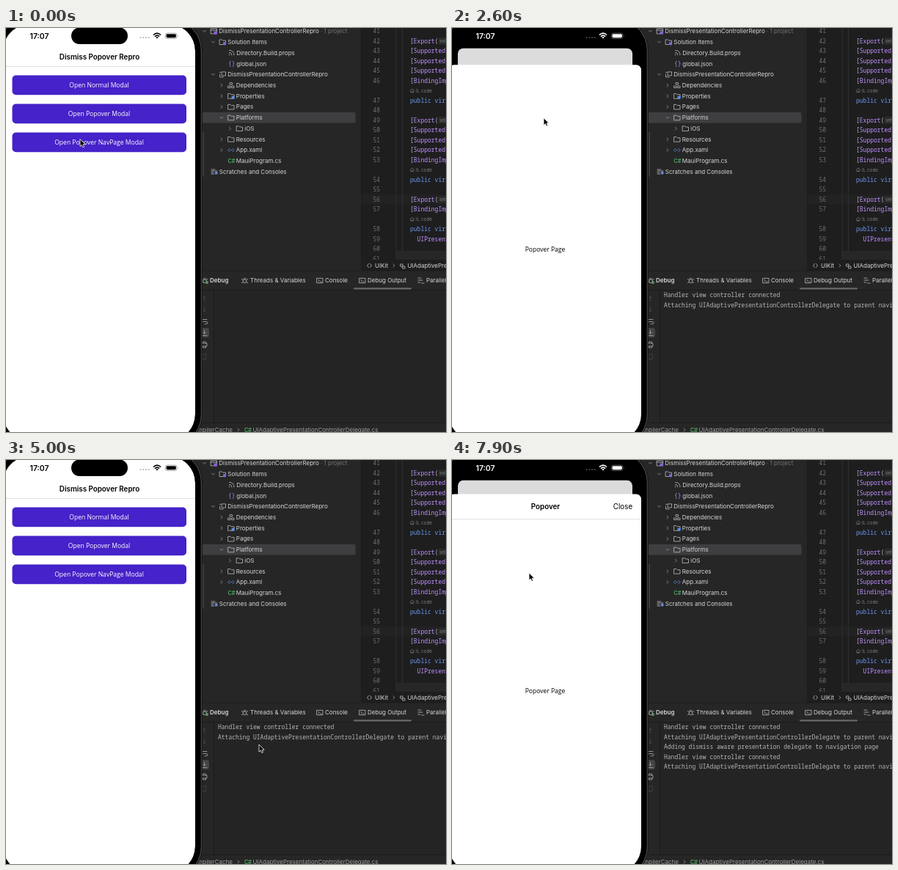
Write an HTML page that moves like this. It is 600 px wide and 551 px high and loops after 8000 ms.

```html
<!DOCTYPE html>
<html lang="en">
<head>
<meta charset="utf-8">
<title>Dismiss Popover Repro</title>
<style>
html, body { margin: 0; width: 100%; height: 100%; overflow: hidden; background: #1e1e1f; }
svg { display: block; width: 600px; height: 551px; }
text { white-space: pre; }
.ui { font: 8px Inter, sans-serif; fill: #d7d7d9; }
.mono { font: 500 8px "Noto Sans Mono", "DejaVu Sans Mono", monospace; fill: #b6b6b8; }
.hint { font: 6.3px Inter, sans-serif; fill: #7c7d80; }
.btn { font: 8.55px "Open Sans", sans-serif; text-anchor: middle; }
.nav { font: 600 9.8px Inter, sans-serif; text-anchor: middle; fill: #000; }
.line { fill: none; stroke: #b9bbbf; stroke-width: .8; stroke-linecap: round; stroke-linejoin: round; }
</style>
</head>
<body>
<svg viewBox="0 0 600 551">
  <defs>
    <clipPath id="screen"><rect x="-4" y="-5" width="262" height="568" rx="36"/></clipPath>
    <clipPath id="editor"><rect x="484" y="0" width="116" height="316"/></clipPath>
  </defs>
  <rect width="600" height="551" fill="#1e1e1f"/>
  <g id="ide"></g>
  <g id="log"></g>

  <rect x="266" y="141" width="4" height="62" rx="1.5" fill="#3c3c3d"/>
  <rect x="-13" y="-14" width="281" height="586" rx="45" fill="#111"/>
  <rect x="-12" y="-13" width="278.4" height="584" rx="44" fill="#000" stroke="#404041" stroke-width="1.5"/>
  <g clip-path="url(#screen)">
    <g id="page">
      <rect class="card" x="-4" y="-5" width="262" height="568" fill="#fff"/>
      <path d="M-4 52.5H258" stroke="#d2d2d4" stroke-width=".7"/>
      <text class="nav" x="127.5" y="42.5">Dismiss Popover Repro</text>
      <g id="buttons"></g>
      <rect class="card" id="dim" x="-4" y="-5" width="262" height="568"/>
    </g>
    <g id="sheet">
      <rect x="-4" width="262" height="620" rx="7" fill="#fff"/>
      <g id="bar">
        <text class="nav" x="127.5" y="20.6">Popover</text>
        <text class="nav" x="233" y="20.6" style="font-weight:400">Close</text>
        <path d="M-4 34.5H258" stroke="#d2d2d4" stroke-width=".7"/>
      </g>
      <text class="btn" id="label" x="127" y="255">Popover Page</text>
    </g>
  </g>
  <rect x="89" y="-.5" width="77" height="22.5" rx="11.2" fill="#000"/>
  <text class="nav" id="clock" x="45.5" y="14.6" style="font-size:10.4px">17:07</text>
  <g id="status">
    <g opacity=".3">
      <circle cx="183.5" cy="13" r="1"/><circle cx="187.3" cy="13" r="1"/>
      <circle cx="191" cy="13" r="1"/><circle cx="194.7" cy="13" r="1"/>
    </g>
    <g fill="none" stroke="currentColor" stroke-width="1.6">
      <path d="M200.9 9.5Q206 4.6 211.1 9.5M202.9 11.6Q206 8.7 209.1 11.6"/>
    </g>
    <path d="M206 14.6L204.3 12.8Q206 11.4 207.7 12.8Z"/>
    <rect x="217.4" y="7" width="15.6" height="7.4" rx="2.4" fill="none" stroke="currentColor" stroke-width=".7" opacity=".45"/>
    <rect x="218.6" y="8.2" width="13.2" height="5" rx="1.4"/>
    <path d="M234 9.5Q235.3 10.7 234 11.9Z" opacity=".5"/>
  </g>
  <path id="pointer" d="M0 0V10L2.3 7.9L3.8 11.3L5.6 10.5L4.1 7.2H7.2Z" fill="#000" stroke="#fff" stroke-width=".8"/>
</svg>
<script>
const $ = id => document.getElementById(id);
const rect = (x, y, w, h, fill, r = 0) =>
  `<rect x="${x}" y="${y}" width="${w}" height="${h}" rx="${r}" fill="${fill}"/>`;
const path = (d, style = '') => `<path class="line" d="${d}" style="${style}"/>`;
// y is the vertical middle of the text
const text = (cls, x, y, str, style = '') =>
  `<text class="${cls}" x="${x}" y="${y + 2.9}" style="${style}">${str}</text>`;
const chevron = (x, y, open) =>
  path(open ? `M${x - 2} ${y - 1}l2 2l2-2` : `M${x - 1} ${y - 2}l2 2l-2 2`, 'stroke:#9a9ca0');

const icons = {
  folder: (x, y) => path(`M${x - 4} ${y - 3.2}h3l1.2 1.2h3.8v5.4h-8z`),
  marked: (x, y) => icons.folder(x, y) + rect(x + .5, y, 4, 4, '#8a63d8', 1),
  tool: (x, y) => icons.folder(x, y) + rect(x + .5, y, 4, 4, '#5b8def', 1),
  sln: (x, y) => path(`M${x - 4} ${y - 3.4}h8v6.8h-8zM${x - 4} ${y - 1.2}h8`) + rect(x, y, 4.5, 4, '#8a63d8', 1),
  proj: (x, y) => path(`M${x - 1} ${y - 3.5}h5v5h-5zM${x - 4} ${y}v3.5h5M${x - 4} ${y - 3}h1.5`),
  props: (x, y) => path(`M${x - 3} ${y + 3}v-1M${x - 3} ${y - .5}q3.5 0 3.5 3.5M${x - 3} ${y - 3.5}q6.5 0 6.5 6.5`),
  json: (x, y) => text('mono', x - 4.6, y, '{}', 'fill:#a98bf0'),
  deps: (x, y) => path(`M${x - 1.5} ${y - 3.5}h3v2.5h-3zM${x - 4} ${y + 1}h3v2.5h-3zM${x + 1} ${y + 1}h3v2.5h-3z`),
  xaml: (x, y) => path(`M${x - 2} ${y - 2.2}l-2.2 2.2l2.2 2.2M${x + 2} ${y - 2.2}l2.2 2.2l-2.2 2.2M${x - 1} ${y}h2`, 'stroke:#6c95eb'),
  cs: (x, y) => text('ui', x - 4.6, y, 'C#', 'fill:#4fae62;font-size:7.2px;font-weight:600'),
  scratch: (x, y) => path(`M${x - 4} ${y - 3}h5M${x - 4} ${y - 1}h8M${x - 4} ${y + 1}h3M${x - 4} ${y + 3}h4`) + rect(x + 1, y, 3.5, 3.5, '#5b8def', 1),
  term: (x, y) => path(`M${x - 4} ${y - 3.2}h8v6.4h-8zM${x - 2} ${y - 1.2}l1.4 1.2l-1.4 1.2M${x + .5} ${y + 1.5}h1.5`),
  bug: (x, y) => path(`M${x} ${y - 2}q2.4 0 2.4 2.6t-2.4 2.6t-2.4-2.6t2.4-2.6M${x - 4} ${y - 2}l1.8 1M${x + 4} ${y - 2}l-1.8 1M${x - 4} ${y + 3}l1.8-1M${x + 4} ${y + 3}l-1.8-1M${x - 1.5} ${y - 3.5}l1.5 1.5l1.5-1.5`),
};

// chevron: 'v' open, '>' closed, '' none
const tree = [
  [283.5, 'v', 'sln', 'DismissPresentationControllerRepro'],
  [295.5, 'v', 'marked', 'Solution Items'],
  [307.5, '', 'props', 'Directory.Build.props'],
  [307.5, '', 'json', 'global.json'],
  [295.5, 'v', 'proj', 'DismissPresentationControllerRepro'],
  [307, '>', 'deps', 'Dependencies'],
  [307, '>', 'tool', 'Properties'],
  [307, '>', 'folder', 'Pages'],
  [307, 'v', 'folder', 'Platforms'],
  [318.5, '>', 'folder', 'iOS'],
  [307, '>', 'folder', 'Resources'],
  [307, '>', 'xaml', 'App.xaml'],
  [307, '', 'cs', 'MauiProgram.cs'],
  [284, '', 'scratch', 'Scratches and Consoles'],
];

function drawTree() {
  let s = rect(258, 0, 226, 331, '#262627') + rect(258, 115, 218.5, 14.5, '#3e3e40', 2);
  tree.forEach(([x, fold, icon, name], i) => {
    const y = 4.4 + i * 14.74;
    if (fold) s += chevron(x - 13, y, fold === 'v');
    s += icons[icon](x, y) + text('ui', x + 6.8, y, name);
  });
  return s + text('ui', 429, 4.4, '· 1 project', 'fill:#747577');
}

function drawEditor() {
  const attr = name => `<tspan>[</tspan><tspan fill="#c191ff">${name}</tspan>`;
  const exp = attr('Export') + '(', sup = attr('Supported'), bind = attr('BindingImpl');
  const pub = '<tspan fill="#6c95eb">public virtual</tspan>';
  const rows = ['', exp, sup, sup, sup, bind, 0, pub, '', exp, sup, sup, sup, bind, 0, pub, '',
    exp, bind, 0, pub, '  <tspan fill="#c191ff">UIPresentation</tspan>', '', ''];
  let s = rect(484, 227, 116, 13.5, '#222223') + rect(532, 304, 68, 12, '#272728')
    + path('M532 0V316M540.5 0V304', 'stroke:#343435') + path('M484 0V331', 'stroke:#19191a');
  let num = 41;
  rows.forEach((row, i) => {
    const y = 4.4 + i * 13.49;
    if (row === 0) {
      s += path(`M551.5 ${y}l2.5-2.5l2.5 2.5l-2.5 2.5zM552 ${y + 2}h4`, 'stroke:#7c7d80')
        + text('hint', 559, y - .6, 'IL code');
      return;
    }
    s += text('mono', 510, y, num++, 'fill:#6f7073;text-anchor:end;font-weight:400') + text('mono', 551, y, row);
    if (row === exp) s += rect(589.5, y - 5, 20, 10, '#2b2b2c', 2) + text('hint', 591, y - .6, 'selector');
  });
  return `<g clip-path="url(#editor)">${s}</g>`
    + path('M494.5 321.5l-2 2.5l2 2.5M496.5 321.5l2 2.5l-2 2.5')
    + text('ui', 503, 324, 'UIKit') + chevron(529, 324, false)
    + path('M538 322h3v3h-3zM541 325h3v3h-3z') + text('ui', 547.5, 324, 'UIAdaptivePresentation');
}

function drawDebug() {
  return rect(258, 331, 342, 207, '#262627') + rect(284, 357, 316, 181, '#242425')
    + path('M258 331H600M258 357.3H600M283.5 357V538M258 538.5H600', 'stroke:#1a1a1b')
    + rect(474, 354.3, 79, 2.2, '#67686a', 1)
    + icons.bug(271, 344.5) + `<circle cx="274" cy="347" r="2" fill="#57965c"/>`
    + text('ui', 278, 344.5, 'Debug', 'font-weight:600')
    + icons.bug(325.5, 344.5) + text('ui', 333, 344.5, 'Threads &amp; Variables')
    + icons.term(428, 344.5) + text('ui', 435, 344.5, 'Console')
    + icons.term(486, 344.5) + text('ui', 493, 344.5, 'Debug Output')
    + path('M562 341h4M562 344h6M562 347h3M567 348h3') + text('ui', 573, 344.5, 'Parallel Stacks')
    + rect(262, 409, 15, 13, '#444446', 3)
    + path('M270.5 373v-7l-2 2M270.5 366l2 2M270.5 380v7l-2-2M270.5 387l2-2M267 445h7M268 447v5h5v-5', 'stroke:#48494b')
    + path('M266 397.5h8M266 400.5h7q2 0 2 1.6t-2 1.6h-2M270.5 412v5l-2-2M270.5 417l2-2M267 419.5h7M267 430h7v4h-7zM268.5 430v-2h4v2M268.5 434v2h4v-2', 'stroke:#a9aaad')
    + rect(258, 539, 342, 12, '#262627')
    + text('ui', 309, 548, 'CompilerCache', 'text-anchor:end;fill:#9c9d9f')
    + chevron(317, 548, false) + icons.cs(329.5, 548)
    + text('ui', 336.5, 548, 'UIAdaptivePresentationControllerDelegate.cs', 'fill:#9c9d9f');
}

$('ide').innerHTML = drawTree() + drawEditor() + drawDebug();

const connected = 'Handler view controller connected';
const attaching = 'Attaching UIAdaptivePresentationControllerDelegate to parent navigation';
const log = [
  [1400, connected], [1400, attaching],
  [7600, 'Adding dismiss aware presentation delegate to navigation page'],
  [7600, connected], [7600, attaching],
];
$('log').innerHTML = log.map(([, str], i) => text('mono', 289, 364.5 + i * 13.5, str)).join('');

$('buttons').innerHTML = ['Open Normal Modal', 'Open Popover Modal', 'Open Popover NavPage Modal']
  .map((str, i) => rect(8.5, 64.5 + i * 39, 237.5, 26.7, '#4522c9', 5)
    + text('btn', 127, 78.1 + i * 39, str, 'fill:#fff')).join('');

const LOOP = 8000, OPEN = 1247, GRAB = 2500, DROP = 3300, OPEN_NAV = 7450;
const TOP = 45, TRAVEL = 518, RATE = .018;
const titles = $('buttons').querySelectorAll('text');
const cards = document.querySelectorAll('.card');
const ramp = (t, a, b) => Math.min(1, Math.max(0, (t - a) / (b - a)));
const spring = ms => ms <= 0 ? 0 : 1 - (1 + RATE * ms) * Math.exp(-RATE * ms);

// time, x, y, linear
const moves = [
  [0, 101, 151.5], [100, 101, 151.5], [800, 113, 121.5], [1400, 113, 121.5], [2000, 125, 117.5],
  [GRAB, 125, 117.5], [2600, 125, 122.5, 1], [3000, 129, 185, 1], [DROP, 133, 352, 1],
  [3400, 134, 365, 1], [3700, 135, 367], [4500, 345, 388], [5050, 345, 388], [5250, 352, 396],
  [5700, 340, 110], [6400, 331, 1.5], [6650, 331, 1.5], [7350, 105, 154], [LOOP, 105, 154],
];
function pointerAt(t) {
  const i = Math.max(1, moves.findIndex(m => m[0] >= t));
  const [t0, x0, y0] = moves[i - 1], [t1, x1, y1, linear] = moves[i];
  let k = ramp(t, t0, t1);
  if (!linear) k = k * k * (3 - 2 * k);
  return [x0 + (x1 - x0) * k, y0 + (y1 - y0) * k];
}

// how far the sheet is up, 0 to 1
function raised(t) {
  if (t >= OPEN_NAV) return spring(t - OPEN_NAV);
  if (t < GRAB) return spring(t - OPEN);
  const drag = 1 - (pointerAt(Math.min(t, DROP))[1] - pointerAt(GRAB)[1]) / TRAVEL;
  const left = drag * (1 - spring(t - DROP));
  return left < .001 ? 0 : left;
}

const grey = k => { const v = Math.round(255 * k); return `rgb(${v},${v},${v})`; };
const pressed = (t, a) => t < a ? 1 : .2 + .8 * ramp(t, a + 200, a + 450);

function draw(t) {
  const p = raised(t), nav = t >= OPEN_NAV, s = 1 - .092 * p;
  $('page').setAttribute('transform', `translate(${127 * (1 - s)} ${32.5 * p}) scale(${s})`);
  cards.forEach(c => c.setAttribute('rx', 36 - 28 * p));
  $('dim').setAttribute('opacity', .14 * p);
  $('sheet').setAttribute('transform', `translate(0 ${TOP + TRAVEL * (1 - p)})`);
  $('sheet').style.display = p > 0 ? '' : 'none';
  $('bar').style.display = nav ? '' : 'none';
  $('label').setAttribute('y', nav ? 271.7 : 255);

  const shown = ramp(t, 1310, 1510) + ramp(t, 7540, 7720);
  $('clock').style.fill = grey(shown - ramp(t, 3380, 3600));
  $('status').style.fill = $('status').style.color = grey(shown - ramp(t, 3290, 3390));

  titles[1].style.opacity = pressed(t, 1230);
  titles[2].style.opacity = pressed(t, 7430);
  [...$('log').children].forEach((el, i) => el.style.display = t >= log[i][0] ? '' : 'none');
  $('pointer').setAttribute('transform', `translate(${pointerAt(t)})`);
}

const start = performance.now();
function tick() {
  draw((performance.now() - start) % LOOP);
  requestAnimationFrame(tick);
}
tick();
</script>
</body>
</html>
```
